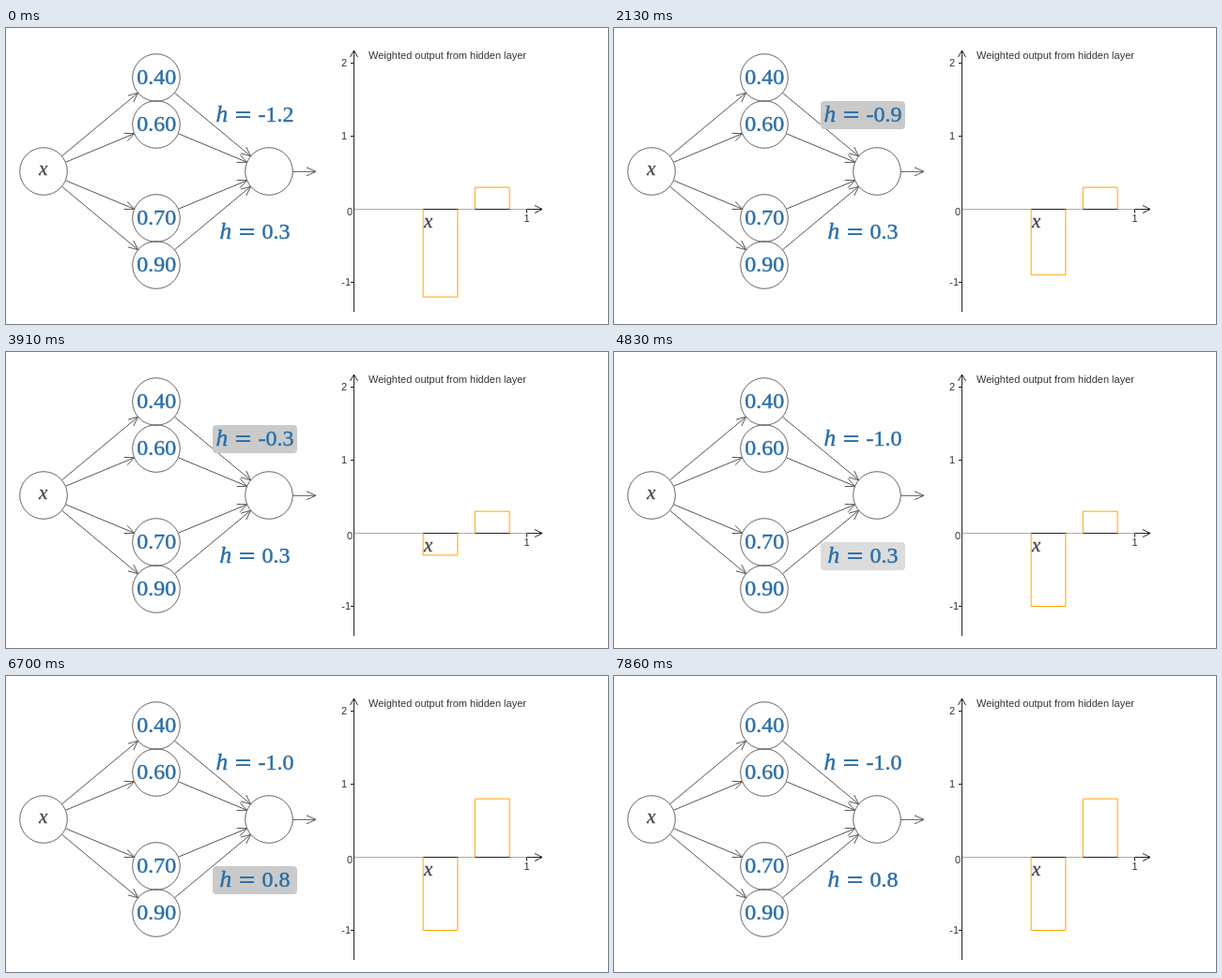
Write an HTML page with a canvas that moves like this. It is 641x316 px and loops after 8000 ms.

```html
<!DOCTYPE html>
<html lang="en">
<head>
<meta charset="utf-8">
<title>Hidden layer weights</title>
<style>
  html, body { margin: 0; width: 100%; height: 100%; overflow: hidden; background: #fff; }
  canvas { display: block; }
</style>
</head>
<body>
<canvas id="stage" width="641" height="316"></canvas>
<script>
const ctx = document.getElementById('stage').getContext('2d');
const LOOP = 8000;
const SERIF = '"Liberation Serif", Times, serif';
const SANS = '"Liberation Sans", Arial, sans-serif';
const INK = '#555', BLUE = '#2a6ea6', ORANGE = '#ffa500';
const RADIUS = 25.3;

// drags: [first step, last step, step count, end value]
// glow: [time, colour]
const HOVER = '#dcdcdc', PRESSED = '#cacaca';
const weights = [
  {
    y: 93, from: 0.4, to: 0.6, start: -1.2,
    drags: [[1210, 1210, 1, -1.4], [1440, 1520, 2, -1.6], [1840, 2600, 11, 0.3],
            [2670, 2900, 4, 1.2], [3450, 4070, 9, -1]],
    glow: [[210, HOVER], [290, null], [600, HOVER], [1060, PRESSED], [4450, null]]
  },
  {
    y: 218, from: 0.7, to: 0.9, start: 0.3,
    drags: [[5140, 5140, 1, 0.2], [5310, 5380, 2, -0.2], [5540, 5920, 6, -1],
            [6320, 6850, 8, 1.4], [7160, 7390, 4, 0.9], [7790, 7790, 1, 0.8]],
    glow: [[4830, HOVER], [5080, PRESSED], [7860, null]]
  }
];

const input = [40, 153], output = [280, 153];
const hidden = [[53, '0.40'], [103, '0.60'], [203, '0.70'], [253, '0.90']];

function valueAt(weight, t) {
  let value = weight.start;
  for (const [first, last, steps, end] of weight.drags) {
    if (t < first) break;
    const gap = (last - first) / Math.max(1, steps - 1);
    const done = gap ? Math.min(steps, Math.floor((t - first) / gap + 0.02) + 1) : 1;
    value += (end - value) * done / steps;
  }
  return Math.round(value * 10) / 10;
}

function glowAt(weight, t) {
  let colour = null;
  for (const [time, next] of weight.glow) if (t >= time) colour = next;
  return colour;
}

function path(points, colour, width = 1) {
  ctx.beginPath();
  points.forEach(([x, y]) => ctx.lineTo(x, y));
  ctx.strokeStyle = colour;
  ctx.lineWidth = width;
  ctx.stroke();
}

function text(str, x, y, font, colour, align = 'left', weight = 0) {
  ctx.font = font;
  ctx.textAlign = align;
  ctx.fillStyle = ctx.strokeStyle = colour;
  ctx.fillText(str, x, y);
  if (weight) {
    ctx.lineWidth = weight;
    ctx.strokeText(str, x, y);
  }
}

function arrow(from, to, colour = INK, length = 10, spread = 4.5) {
  const angle = Math.atan2(to[1] - from[1], to[0] - from[0]);
  const c = Math.cos(angle), s = Math.sin(angle);
  const barb = side => [to[0] - length * c - side * spread * s,
                        to[1] - length * s + side * spread * c];
  path([from, to], colour);
  path([barb(1), to, barb(-1)], colour);
}

function connect(a, b) {
  const d = Math.hypot(b[0] - a[0], b[1] - a[1]);
  const ux = (b[0] - a[0]) / d * RADIUS, uy = (b[1] - a[1]) / d * RADIUS;
  arrow([a[0] + ux, a[1] + uy], [b[0] - ux, b[1] - uy]);
}

function node([x, y]) {
  ctx.beginPath();
  ctx.arc(x, y, RADIUS, 0, 2 * Math.PI);
  ctx.strokeStyle = INK;
  ctx.lineWidth = 0.9;
  ctx.stroke();
}

function drawNetwork() {
  for (const [y, label] of hidden) {
    connect(input, [160, y]);
    connect([160, y], output);
    node([160, y]);
    text(label, 160.3, y + 7.3, `24px ${SERIF}`, BLUE, 'center', 0.45);
  }
  node(input);
  node(output);
  arrow([305, 153.3], [330, 153.3]);
  text('x', 39.7, 157, `italic 21px ${SERIF}`, '#444', 'center', 0.3);
}

function drawWeight(weight, t) {
  const value = valueAt(weight, t), glow = glowAt(weight, t);
  if (glow) {
    ctx.beginPath();
    ctx.roundRect(220, weight.y - 15, 90, 30, 4);
    ctx.fillStyle = glow;
    ctx.fill();
  }
  const x = value < 0 ? 222.8 : 226.8, y = weight.y + 7.2;
  text('h', x + 0.6, y, `italic 25.5px ${SERIF}`, BLUE, 'left', 0.45);
  text('=', x + 29.8, y, '24px "DejaVu Serif", serif', BLUE, 'center');
  text(value.toFixed(1), x + 45.6, y, `24px ${SERIF}`, BLUE, 'left', 0.45);
}

const plotX = v => 370.5 + 184 * v;
const plotY = v => 193.5 - 78 * v;

function drawPlot(t) {
  const zero = plotY(0), dark = '#222';
  const label = (str, x, y, align = 'right') => text(str, x, y, `11px ${SANS}`, '#333', align);

  arrow([370.5, 303], [370.5, 24], dark, 7, 4);
  arrow([370.5, zero], [571, zero], dark, 8, 4);
  for (const v of [2, 1, -1]) {
    path([[367, plotY(v)], [370, plotY(v)]], dark);
    label(String(v), v < 0 ? 367 : 363, plotY(v) + 3);
  }
  path([[554.5, zero], [554.5, zero + 4]], dark);
  label('0', 369, 200);
  label('1', 554.5, 207, 'center');
  label('Weighted output from hidden layer', 386, 33, 'left');
  text('x', 449.6, 213, `italic 21px ${SERIF}`, '#444', 'center', 0.3);

  for (const [a, b] of [[0, 0.4], [0.6, 0.7], [0.9, 1]]) {
    path([[plotX(a) + 0.5, zero], [plotX(b), zero]], '#aaa');
  }

  ctx.save();
  ctx.beginPath();
  ctx.rect(360, 0, 281, 303);
  ctx.clip();
  for (const weight of weights) {
    const left = plotX(weight.from), right = plotX(weight.to);
    const top = plotY(valueAt(weight, t));
    path([[left, zero], [left, top], [right, top], [right, zero]], ORANGE);
  }
  ctx.restore();
}

function draw(now) {
  const t = now % LOOP;
  ctx.fillStyle = '#fff';
  ctx.fillRect(0, 0, 641, 316);
  drawNetwork();
  weights.forEach(weight => drawWeight(weight, t));
  drawPlot(t);
}

let begin;
function tick(now) {
  begin ??= now;
  draw(Math.max(0, now - begin));
  requestAnimationFrame(tick);
}
draw(0);
requestAnimationFrame(tick);
</script>
</body>
</html>
```
